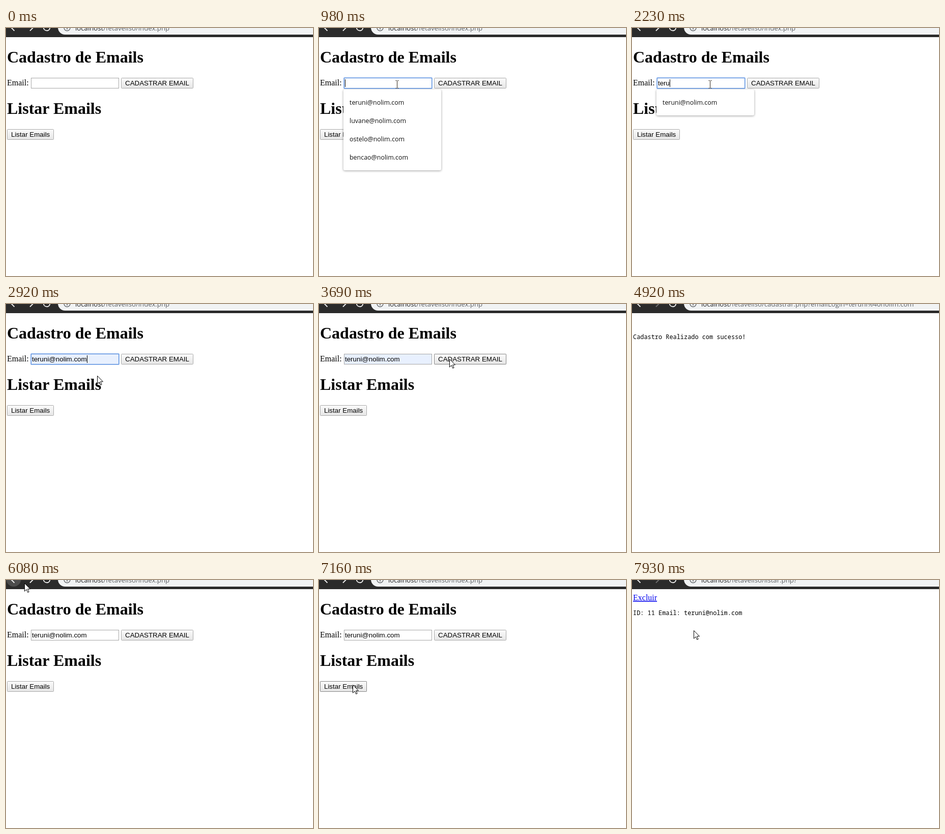
Animation of 603x488 px, one loop 8000 ms. Source, as an HTML page:

```html
<!DOCTYPE html>
<html lang="pt-BR">
<head>
<meta charset="utf-8">
<title>Cadastro de Emails</title>
<style>
  html, body { margin: 0; width: 100%; height: 100%; overflow: hidden; background: #fff; }
  svg { display: block; width: 100%; height: 100%; }
  text { white-space: pre; }
  .serif { font: 16px "Liberation Serif", serif; }
  .title { font: bold 32px "Liberation Serif", serif; }
  .form { font: 13.333px "Liberation Sans", sans-serif; }
  .mono { font: 11.92px "Noto Sans Mono", monospace; }
  .url { font: 13.2px "Open Sans", sans-serif; fill: #5f6368; }
  .url tspan { fill: #202124; }
  .item { font: 12.45px "Open Sans", sans-serif; fill: #111; }
  .panel { fill: #fff; filter: drop-shadow(0 1px 2px rgba(0, 0, 0, .38)); }
  .button rect { fill: url(#face); stroke: #a9a9a9; }
  .button .hover { fill: none; stroke: #858585; }
  .ring { fill: none; stroke: #5a8fdc; }
  .ring + .ring { stroke: #a3c2f2; }
  .icon { fill: none; stroke: #f1f1f1; stroke-width: 1.9; }
  .dim { opacity: .35; }
</style>
</head>
<body>
<svg viewBox="0 0 603 488" preserveAspectRatio="none">
  <defs>
    <linearGradient id="face" x2="0" y2="1">
      <stop stop-color="#fbfbfb"/><stop offset="1" stop-color="#e6e6e6"/>
    </linearGradient>
  </defs>
  <rect width="603" height="488" fill="#fff"/>

  <!-- data-on: spans between named moments during which a part is visible -->
  <g data-on="start-sent returned-listed">
    <text class="title" x="2" y="68">Cadastro de Emails</text>
    <text class="serif" x="2" y="113">Email:</text>
    <rect x="49.5" y="98.5" width="172" height="20" fill="#fff" stroke="#a6a6a6"/>
    <rect x="50" y="99" width="171" height="19" fill="#e8f0fe" data-on="preview-sent"/>
    <g data-on="focus-submit">
      <rect class="ring" x="49.5" y="98.5" width="172" height="20"/>
      <rect class="ring" x="48.5" y="97.5" width="174" height="22" rx="1"/>
    </g>
    <text id="typed" class="form" x="51" y="113"></text>
    <g data-on="focus-preview pick-submit"><rect id="caret" y="101" width="1" height="15"/></g>

    <g class="button">
      <rect x="226.5" y="98.5" width="141" height="20" rx="1"/>
      <rect class="hover" x="226.5" y="98.5" width="141" height="20" rx="1" data-on="overSubmit-sent"/>
      <text class="form" x="234" y="113">CADASTRAR EMAIL</text>
    </g>

    <text class="title" x="2" y="169">Listar Emails</text>
    <g class="button">
      <rect x="2.5" y="199.5" width="91" height="20" rx="1"/>
      <rect class="hover" x="2.5" y="199.5" width="91" height="20" rx="1" data-on="overList-listed"/>
      <text class="form" x="10" y="214">Listar Emails</text>
    </g>
  </g>

  <g data-on="suggest-pick">
    <rect id="panel" class="panel" x="48" y="121" width="192" rx="3"/>
    <rect x="48" y="128" width="192" height="36" fill="#ececec" data-on="overItem-pick"/>
    <text class="item" x="60" y="151">teruni@nolim.com</text>
    <g class="item" data-on="suggest-narrow">
      <text x="60" y="187">luvane@nolim.com</text>
      <text x="60" y="223">ostelo@nolim.com</text>
      <text x="60" y="259">bencao@nolim.com</text>
    </g>
  </g>

  <text class="mono" x="2" y="69" data-on="sent-returned">Cadastro Realizado com sucesso!</text>

  <g data-on="listed-end">
    <text class="serif" x="2" y="40" fill="#00e" text-decoration="underline">Excluir</text>
    <text class="mono" x="2" y="69">ID: 11 Email: teruni@nolim.com</text>
  </g>

  <rect width="603" height="18" fill="#2b2b2b"/>
  <circle cx="15" cy="-1.5" r="14.5" fill="#4c4c4c" data-on="goBack-offBack"/>
  <path class="icon" d="M16.5 5.5L9.5 -1.5"/>
  <path class="icon" d="M47 5.5L54 -1.5" data-on="start-sent returned-listed"/>
  <path class="icon dim" d="M47 5.5L54 -1.5" data-on="sent-returned listed-end"/>
  <path class="icon" d="M73.8 -1A6.3 6.3 0 0 0 86.3 0"/>
  <rect x="102" y="-15" width="540" height="28" rx="14" fill="#f1f3f4"/>
  <circle cx="120" cy="-.5" r="6" fill="none" stroke="#5f6368" stroke-width="1.4"/>
  <path d="M120 -2V3" stroke="#5f6368" stroke-width="1.5"/>
  <g class="url">
    <text x="136" y="4.5" data-on="start-sent returned-listed"><tspan>localhost</tspan>/fetaveliso/index.php</text>
    <text x="136" y="4.5" data-on="sent-returned"><tspan>localhost</tspan>/fetaveliso/cadastrar.php?emailLogin=teruni%40nolim.com</text>
    <text x="136" y="4.5" data-on="listed-end"><tspan>localhost</tspan>/fetaveliso/listar.php?</text>
  </g>

  <g id="pointer">
    <path d="M.5 .5V16.2L4.2 12.7L6.7 18.4L9.1 17.4L6.6 11.8H11.5Z" fill="#fff" stroke="#000"
          data-on="enter-overField offField-hide show-end"/>
    <path d="M-3 -7.5H-1L0 -6.5L1 -7.5H3M0 -6.5V6.5M-3 7.5H-1L0 6.5L1 7.5H3" transform="translate(.5 0)"
          fill="none" stroke="#2d2418" data-on="overField-offField"/>
  </g>
</svg>
<script>
  const EMAIL = 'teruni@nolim.com';
  const BLINK = 530;      // ms per half period of the caret
  const TICK = 77;        // ms between samples of the pointer
  const at = {
    start: 0, enter: 70, overField: 660, focus: 890, suggest: 980,
    type: 1840, narrow: 1910, typed: 2230,
    offField: 2620, overItem: 2620, preview: 2690, pick: 2920,
    overSubmit: 3450, submit: 3690, sent: 3920, hide: 4920,
    show: 5240, goBack: 5620, returned: 5770, offBack: 6160,
    overList: 7160, listed: 7470, end: 8000
  };

  // Each move eases from wherever the pointer is to a new place.
  const moves = [
    { from: 70, to: 510, x: 150, y: 90 },
    { from: 600, to: 660, x: 153, y: 111 },
    { from: 2460, to: 2690, x: 179, y: 141 },
    { from: 3080, to: 3530, x: 256, y: 108 },
    { from: 4070, to: 4150, x: 262, y: 115 },
    { from: 4150, to: 4230, x: 271, y: 112 },
    { from: 4230, to: 4840, x: 28, y: 32 },
    { from: 4920, to: 5300, x: 6, y: 5 },
    { from: 6000, to: 6070, x: 36, y: 6 },
    { from: 6070, to: 6380, x: 60, y: 33 },
    { from: 6400, to: 6900, x: 100, y: 228 },
    { from: 6900, to: 7230, x: 60, y: 203 },
    { from: 7540, to: 7920, x: 121, y: 99 }
  ];

  const clamp = v => Math.min(1, Math.max(0, v));
  const ease = k => k * k * (3 - 2 * k);
  const [typed, caret, panel, pointer] =
    ['typed', 'caret', 'panel', 'pointer'].map(id => document.getElementById(id));
  const parts = [...document.querySelectorAll('[data-on]')].map(node => ({
    node,
    spans: node.dataset.on.split(' ').map(span => span.split('-').map(name => at[name]))
  }));

  function pointAt(t) {
    let x = 443, y = 470;
    for (const move of moves) {
      const k = ease(clamp((t - move.from) / (move.to - move.from)));
      x += (move.x - x) * k;
      y += (move.y - y) * k;
    }
    return [Math.round(x), Math.round(y)];
  }

  // Four letters are typed, ever more slowly; the suggestion fills in the rest.
  function lettersAt(t) {
    if (t < at.type) return 0;
    if (t >= at.preview) return EMAIL.length;
    return 1 + Math.floor(3 * clamp((t - at.type) / (at.typed - at.type)) ** .7);
  }

  function draw(t) {
    for (const { node, spans } of parts) {
      node.style.display = spans.some(([from, to]) => t >= from && t < to) ? '' : 'none';
    }

    const letters = lettersAt(t);
    typed.textContent = EMAIL.slice(0, letters);
    const lastInput = Math.max(...[at.focus, at.type, at.typed, at.pick].filter(m => m <= t));
    const lit = (t - lastInput) % (2 * BLINK) < BLINK;
    caret.setAttribute('opacity', lit ? 1 : 0);
    caret.setAttribute('x', 51 + Math.round(letters && typed.getComputedTextLength()));
    panel.setAttribute('height', t < at.narrow ? 159 : 51);

    const sampled = Math.floor((t + 8) / TICK) * TICK - 8;
    pointer.setAttribute('transform', `translate(${pointAt(sampled)})`);
  }

  const begin = performance.now();
  function frame() {
    draw((performance.now() - begin) % at.end);
    requestAnimationFrame(frame);
  }
  frame();
</script>
</body>
</html>
```
